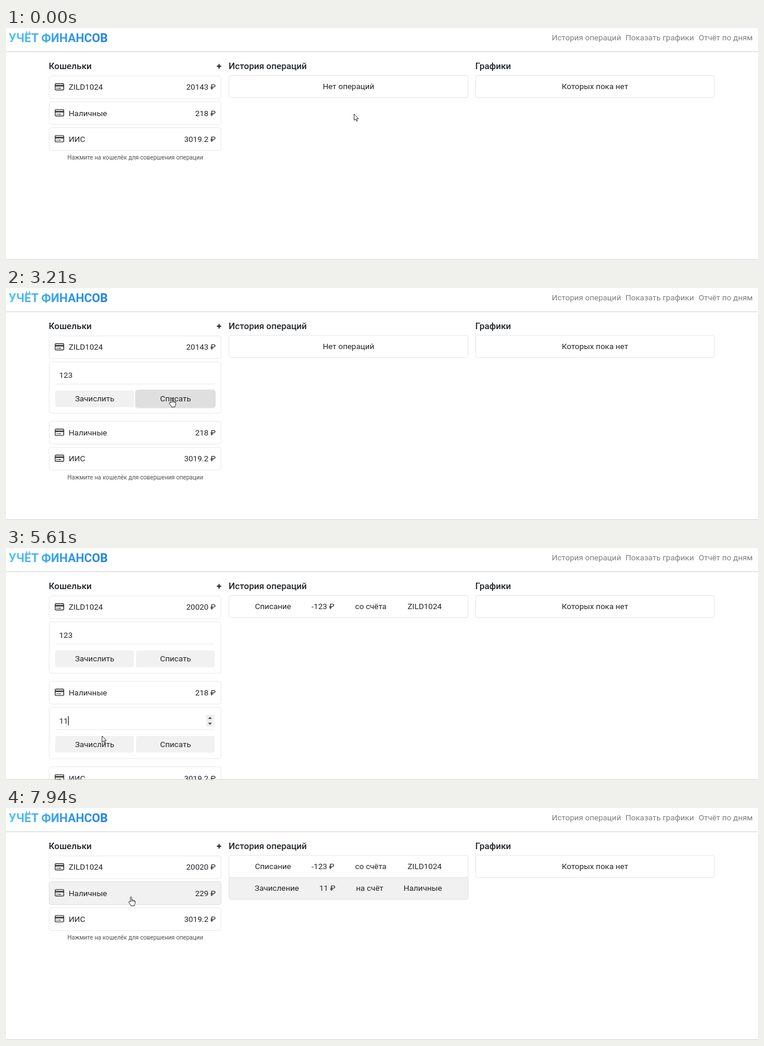
An HTML page for the animation above (8 s loop, 1280x395 px).

```html
<!DOCTYPE html>
<html lang="ru">
<head>
<meta charset="utf-8">
<title>Учёт финансов</title>
<style>
html, body { margin: 0; width: 100%; height: 100%; overflow: hidden; background: #fff; }
svg { display: block; width: 100%; height: 100%; }
text { font: 13.5px Roboto, sans-serif; fill: #212529; white-space: pre; }
.title { font-size: 15.2px; font-weight: 500; }
.plus { font-size: 15.2px; font-weight: 700; }
.logo { font-size: 20.25px; font-weight: 700; fill: url(#sky); }
.nav { fill: #7f7f7f; }
.hint { font-size: 10.13px; fill: #555; }
.ghost { fill: #757575; }
</style>
</head>
<body>
<svg viewBox="0 0 1280 395">
  <defs>
    <linearGradient id="sky" gradientUnits="userSpaceOnUse" x1="5" x2="173" y1="0" y2="0">
      <stop stop-color="#54c3f5"/><stop offset="1" stop-color="#1f7fe6"/>
    </linearGradient>
    <g id="card">
      <rect x=".7" y=".7" width="14.6" height="10.8" rx="1.3" fill="#fff" stroke="#383838" stroke-width="1.4"/>
      <path d="M.7 3h14.6v2.6H.7z" fill="#383838"/>
      <path d="M3 8.5h2M6 8.5h4.5" stroke="#383838" stroke-width="1.4"/>
    </g>
    <path id="arrow" d="M.5 .5V11.2L3 8.9 4.7 12.7 6.3 12 4.7 8.3H8z" fill="#fff" stroke="#222" stroke-width=".9"/>
    <path id="hand" d="M-1.3 9V1.2Q-1.2 .3 -.2 .4 .9 .4 .9 1.3V5.6Q2.6 4.7 3.1 6.1 4.8 5.4 5.2 6.7 6.8 6.4 6.8 8V11Q6.7 12.8 5.5 14V15.7H-.4V14.3L-4 10Q-4.6 8.6 -3.3 8.2 -2.3 8.1 -1.3 9zM.9 5.6V8.4M3.1 6.1V8.6M5.2 6.7V8.8" fill="#fff" stroke="#222" stroke-width=".9" stroke-linejoin="round"/>
    <path id="beam" d="M-2.5 -5H-.7L0 -4.4 .7 -5H2.5M0 -4.4V4.9M-2.5 5.5H-.7L0 4.9 .7 5.5H2.5" fill="none" stroke="#333"/>
  </defs>
  <g id="scene"></g>
</svg>
<script>
const LOOP = 8000;
const scene = document.getElementById('scene');

// start, end, steps, x, y, optional control point
const moves = [
  [190, 960, 11, 235, 85, 430, -44],
  [1190, 1640, 7, 260, 148],
  [2650, 3060, 6, 282, 187],
  [3430, 3600, 3, 242, 238],
  [3990, 4360, 6, 215, 291.5],
  [5450, 5610, 3, 163, 319.5],
  [5840, 6150, 5, 186, 217],
  [6290, 6450, 3, 188, 237],
  [6830, 7170, 5, 195, 98],
  [7540, 7940, 6, 213, 151]
];
const clicks = [[1040, 1190], [1640, 1790], [3280, 3360], [3600, 3750], [4360, 4510],
  [5690, 5840], [6450, 6600], [7170, 7320]];

const between = (t, a, b) => t >= a && t < b;
const ease = p => p * p * (3 - 2 * p);
const typed = (t, word, times) => word.slice(0, times.filter(at => t >= at).length);

function pointer(t) {
  let x = 592, y = 146;
  for (const [start, end, steps, tx, ty, cx = (x + tx) / 2, cy = (y + ty) / 2] of moves) {
    if (t < start) break;
    const step = Math.floor((t - start) / (end - start) * (steps - 1) + 1e-6) + 1;
    const p = ease(Math.min(1, step / steps)), q = 1 - p;
    x = q * q * x + 2 * p * q * cx + p * p * tx;
    y = q * q * y + 2 * p * q * cy + p * p * ty;
  }
  return { x, y };
}

const text = (s, x, y, cls = '', anchor = 'start') =>
  `<text x="${x}" y="${y}" class="${cls}" text-anchor="${anchor}">${s}</text>`;
const mid = (s, x, y, cls) => text(s, x, y, cls, 'middle');
const box = (x, y, w, h, fill, stroke = 'none', r = 4) =>
  `<rect x="${x}" y="${y}" width="${w}" height="${h}" rx="${r}" fill="${fill}" stroke="${stroke}"/>`;
const line = y => `<path d="M0 ${y}H1280" stroke="#d4d4d4"/>`;
const use = (id, x, y) => `<use href="#${id}" x="${x}" y="${y}"/>`;

function draw(t) {
  const at = pointer(t);
  let cursor = 'arrow';
  const over = (x, y, w, h, kind) => {
    const hit = at.x >= x && at.x <= x + w && at.y >= y && at.y <= y + h;
    if (hit) cursor = kind;
    return hit;
  };

  function button(label, x, y, pressed) {
    const hot = over(x, y, 134, 28.5, 'hand'), grow = pressed ? 1.6 : 0;
    return box(x - grow, y - grow, 134 + 2 * grow, 28.5 + 2 * grow, hot ? '#dfdfdf' : '#f1f1f1', 'none', 3.5 + grow)
      + mid(label, x + 67.2, y + 18.8);
  }

  function panel(y, { value, focus, add, take }) {
    const hot = over(84, y + 11, 271, 27, 'beam');
    let out = box(73.5, y + .5, 292.5, 87.5, '#fff', '#e9e9e9')
      + `<path d="M84 ${y + 38.3}H355.5" stroke="#ebebeb"/>`
      + text(value || 'Введите сумму', 90.5, y + 27.8, value ? '' : 'ghost');
    if (focus) {
      const x = 91 + value.length * 7.58;
      out += `<path d="M${x} ${y + 15.5}V${y + 31}" stroke="#111" stroke-width="1.2"/>`;
    }
    if (hot || focus) {
      out += box(340.5, y + 13, 13.5, 20.5, '#efefef', 'none', 1)
        + `<path d="M344 ${y + 20.3}h6.4l-3.2-3.6zM344 ${y + 26.6}h6.4l-3.2 3.6z" fill="#444"/>`;
    }
    return out + button('Зачислить', 83.7, y + 49.3, add) + button('Списать', 221.3, y + 49.3, take);
  }

  function wallet(name, sum, y) {
    const hot = over(73.5, y, 293, 39.4, 'hand');
    return box(73.5, y + .4, 292.5, 38.8, hot ? '#f1f1f1' : '#fff', hot ? '#dedede' : '#e9e9e9')
      + use('card', 83, y + 13) + text(name, 106.7, y + 24.3) + text(sum + ' ₽', 357, y + 24.3, '', 'end');
  }

  const spent = t >= 3360, earned = t >= 5840;
  const wallets = [
    ['ZILD1024', spent ? 20020 : 20143, between(t, 1190, 7320) && {
      value: typed(t, '123', [2030, 2110, 2190]),
      focus: between(t, 1715, 3060), take: between(t, 3210, 3360)
    }],
    ['Наличные', earned ? 229 : 218, between(t, 3750, 6600) && {
      value: typed(t, '11', [5000, 5140]),
      focus: between(t, 4510, 5690), add: between(t, 5690, 5840)
    }],
    ['ИИС', 3019.2, false]
  ];

  let out = text('УЧЁТ ФИНАНСОВ', 4.5, 24.2, 'logo')
    + mid('История операций', 988, 20.8, 'nav')
    + mid('Показать графики', 1112.7, 20.8, 'nav')
    + mid('Отчёт по дням', 1225, 20.8, 'nav')
    + line(40.5)
    + text('Кошельки', 72.7, 69.6, 'title') + mid('+', 362.6, 69.6, 'plus')
    + text('История операций', 379, 69.6, 'title')
    + text('Графики', 798.7, 69.6, 'title');

  let y = 81;
  for (const [name, sum, form] of wallets) {
    out += wallet(name, sum, y);
    if (form) out += panel(y + 44.2, form);
    y += form ? 145.6 : 44.2;
  }
  out += mid('Нажмите на кошелёк для совершения операции', 220, y + 10.5, 'hint');

  out += box(379.5, 80.5, 407, 38, '#fff', '#e6e6e6');
  const entry = (cells, xs, base) => cells.map((s, i) => mid(s, xs[i], base)).join('');
  if (earned) {
    out += '<path d="M379.5 118.5H786.5V152Q786.5 155.5 783 155.5H383Q379.5 155.5 379.5 152Z" fill="#f1f1f1" stroke="#e2e2e2"/>'
      + entry(['Зачисление', '11 ₽', 'на счёт', 'Наличные'], [461, 547, 619, 709.5], 141);
  }
  out += spent
    ? entry(['Списание', '-123 ₽', 'со счёта', 'ZILD1024'], [454.5, 539.5, 621, 712.5], 104.3)
    : mid('Нет операций', 583, 104.3);
  out += box(799.5, 80.5, 406.5, 38, '#fff', '#e6e6e6') + mid('Которых пока нет', 1002.5, 104.3)
    + line(394.5);

  if (clicks.some(([a, b]) => between(t, a, b))) {
    out += `<circle cx="${at.x}" cy="${at.y}" r="10" fill="#f7ef3a" opacity=".8"/>`;
  }
  return out + use(cursor, at.x, at.y);
}

let shown = '';
function tick() {
  const next = draw(performance.now() % LOOP);
  if (next !== shown) scene.innerHTML = shown = next;
  requestAnimationFrame(tick);
}
tick();
</script>
</body>
</html>
```
